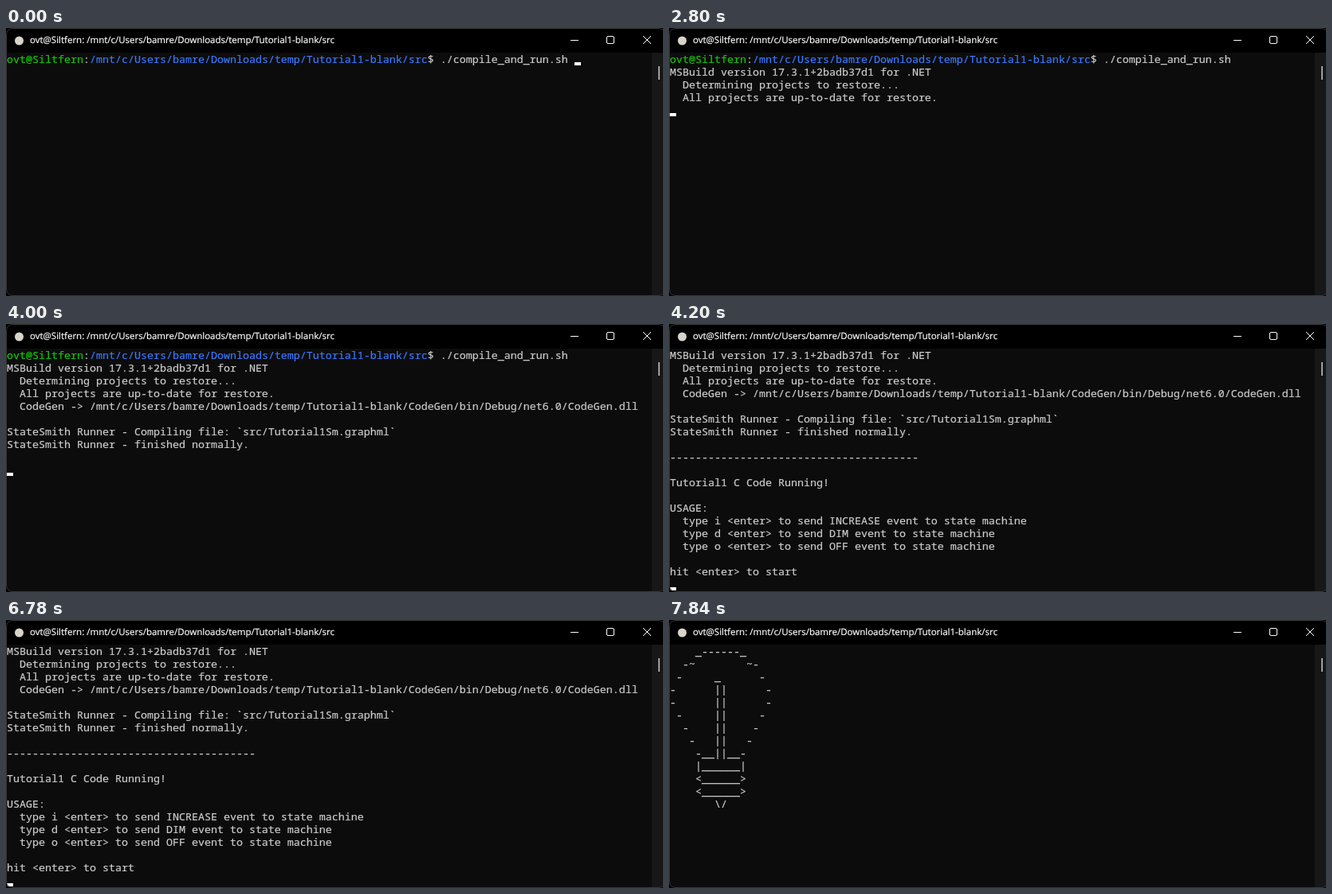
An HTML page for the animation above (8 s loop, 824x337 px).

```html
<!DOCTYPE html>
<html lang="en">
<head>
<meta charset="utf-8">
<title>Terminal</title>
<style>
  html, body { margin: 0; width: 100%; height: 100%; overflow: hidden; background: #000; }
  #stage { position: relative; width: 824px; height: 337px; max-width: 100%; max-height: 100%; overflow: hidden; }
  /* The window runs a little past the right edge of the stage. */
  #window {
    position: absolute; left: 0; top: 0; width: 827px; height: 337px;
    overflow: hidden; border-radius: 8px; background: #0c0c0c;
  }
  #window::after {
    content: ""; position: absolute; inset: 0;
    border: 1px solid #383838; border-radius: 8px;
  }
  #bar { position: absolute; left: 0; top: 0; }
  #title, #screen { -webkit-text-stroke: 0.2px; }
  #title {
    position: absolute; left: 30px; top: 8px; color: #fff; white-space: pre;
    font: 11.5px/16px "Open Sans", "Noto Sans", sans-serif; text-rendering: geometricPrecision;
  }
  #screen {
    position: absolute; left: 1px; top: 31px; margin: 0; color: #ccc;
    font: 13.3333px/16px "Noto Sans Mono", monospace; font-variant-ligatures: none;
  }
  #cursor { position: absolute; width: 8px; height: 4px; background: #fff; }
  .user { color: #16c60c; }
  .path { color: #3b78ff; }
</style>
</head>
<body>
<div id="stage">
  <div id="window">
    <svg id="bar" width="827" height="337">
      <rect width="827" height="31"/>
      <rect x="810" y="31" width="17" height="306" fill="#171717"/>
      <rect x="818" y="48" width="2" height="17" fill="#9f9f9f"/>
      <circle cx="16.5" cy="16" r="5.5" fill="#d8d4cc"/>
      <g fill="none" stroke="#fff">
        <path d="M708 15.5h10M799 10l10 10m0-10l-10 10"/>
        <rect x="753.5" y="10.5" width="9" height="9" rx="1.5"/>
      </g>
    </svg>
    <div id="title"></div>
    <pre id="screen"></pre>
    <div id="cursor"></div>
  </div>
</div>
<script>
const LOOP = 8000, ROW = 16, COLUMN = 8;
const user = "ovt@Siltfern";
const project = "/mnt/c/Users/bamre/Downloads/temp/Tutorial1-blank";
const command = "$ ./compile_and_run.sh ";
const commandEnd = `${user}:${project}/src${command}`.length;

const output = String.raw`MSBuild version 17.3.1+2badb37d1 for .NET
  Determining projects to restore...
  All projects are up-to-date for restore.
  CodeGen -> ${project}/CodeGen/bin/Debug/net6.0/CodeGen.dll

StateSmith Runner - Compiling file: ${"`"}src/Tutorial1Sm.graphml${"`"}
StateSmith Runner - finished normally.

${"-".repeat(39)}

Tutorial1 C Code Running!

USAGE:
  type i <enter> to send INCREASE event to state machine
  type d <enter> to send DIM event to state machine
  type o <enter> to send OFF event to state machine

hit <enter> to start
    _------_
  -~        ~-
 -     _      -
-      ||      -
-      ||      -
 -     ||     -
  -    ||    -
   -   ||   -
    -__||__-
    |______|
    <______>
    <______>
       \/`;

const span = (name, text) => `<span class="${name}">${text}</span>`;
const prompt = span("user", user) + ":" + span("path", project + "/src") + command;
const lines = [prompt, ...output.replaceAll("<", "&lt;").split("\n")];

// [start ms, lines finished, first visible line, cursor lit]
const steps = [
  [0, 0, 0, true],
  [1010, 0, 0, false],
  [1540, 1, 0, true],
  [1740, 2, 0, true],
  [2400, 3, 0, true],
  [2800, 4, 0, true],
  [3600, 5, 0, true],
  [3800, 7, 0, true],
  [3900, 8, 0, true],
  [4000, 9, 0, true],
  [4200, 19, 1, true],
  [5190, 19, 1, false],
  [5720, 19, 1, true],
  [6250, 19, 1, false],
  [6780, 19, 1, true],
  [7110, 19, 2, true],
  [7180, 32, 19, true],
  [7840, 32, 19, false]
];

const byId = id => document.getElementById(id);
const screen = byId("screen"), cursor = byId("cursor");
byId("title").textContent = `${user}: ${project}/src`;

function show([, finished, top, lit]) {
  screen.innerHTML = lines.slice(top, Math.max(finished, 1)).join("\n");
  cursor.style.left = 1 + (finished ? 0 : commandEnd) * COLUMN + "px";
  cursor.style.top = 43 + (finished - top) * ROW + "px";
  cursor.style.visibility = lit ? "visible" : "hidden";
}

const start = performance.now();
let current;
function tick() {
  const time = (performance.now() - start) % LOOP;
  const step = steps.findLast(([at]) => at <= time);
  if (step !== current) show(current = step);
  requestAnimationFrame(tick);
}
tick();
</script>
</body>
</html>
```
